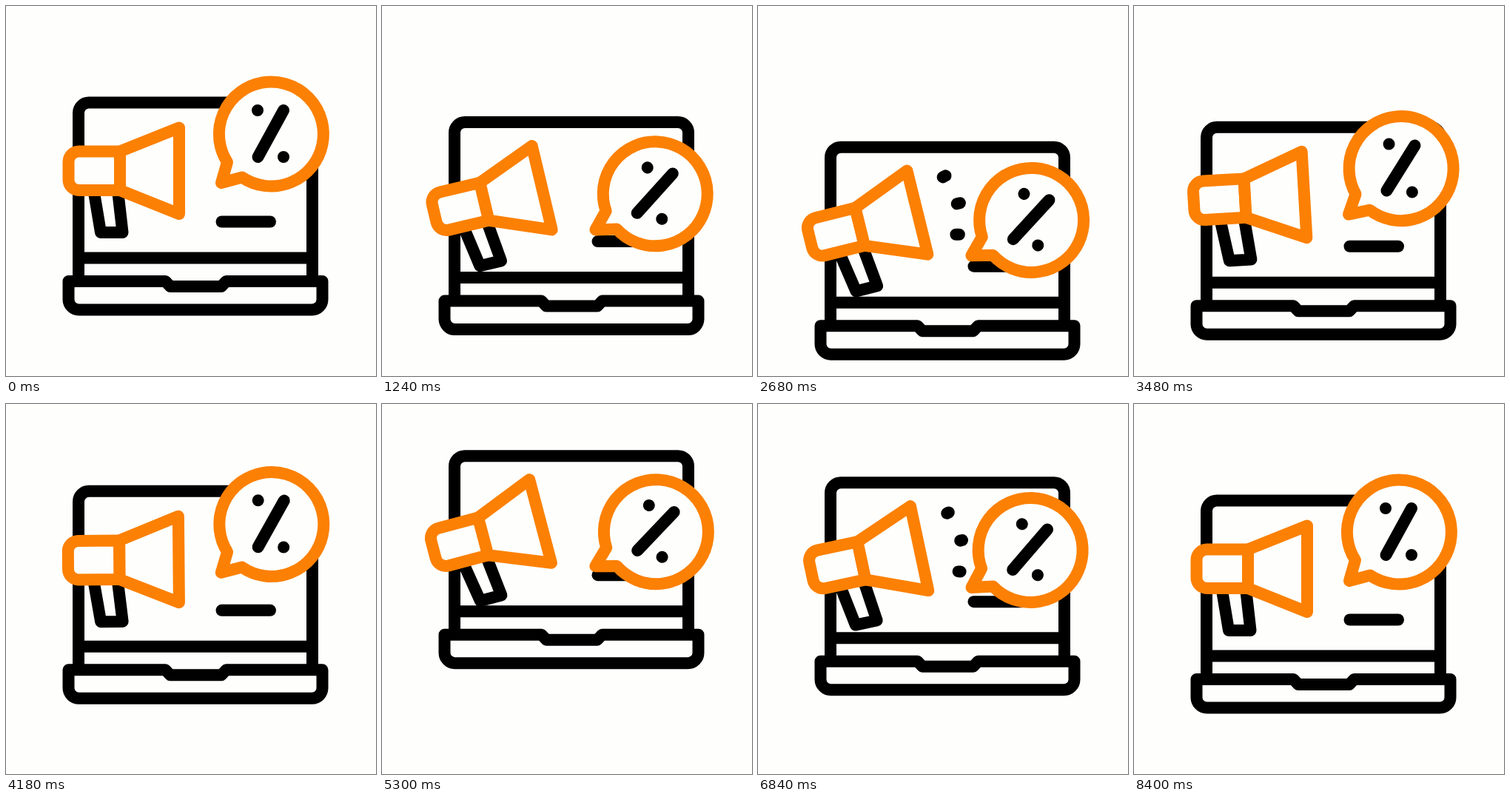
An HTML page that plays this animation: 500 px wide and 500 px high, repeating every 8420 ms.

```html
<!DOCTYPE html>
<html lang="en">
<head>
<meta charset="utf-8">
<title>Laptop promotion</title>
<style>
  html, body { margin: 0; width: 100%; height: 100%; overflow: hidden; background: #fefefc; }
  svg { display: block; width: 100%; height: 100%; }
  path { stroke: #000; stroke-width: 16; stroke-linecap: round; stroke-linejoin: round; fill: none; }
  .filled { fill: #fefefc; }
  .orange { stroke: #fc8003; }
</style>
</head>
<body>
<svg viewBox="0 0 500 500">
  <g id="scene">
    <path d="M98 372V144.500a14 14 0 0 1 14-14H400a14 14 0 0 1 14 14V372M98 340.500H414"/>
    <path class="filled" d="M84.500 372V396.500a14 14 0 0 0 14 14H413.500a14 14 0 0 0 14-14V372H297.500L291 379H222L215.500 372Z"/>
    <path d="M291.500 291.500H357"/>
    <g id="megaphone">
      <path class="filled" d="M118.500 249L128 306H157.500L151 249"/>
      <path class="filled orange" d="M154 196.500H98.500a14 14 0 0 0-14 14V235a14 14 0 0 0 14 14H154Z"/>
      <path class="filled orange" d="M154 196.500L234 164.500V281L154 249Z"/>
      <path class="ray"/>
      <path class="ray"/>
      <path class="ray"/>
    </g>
    <g id="bubble">
      <path class="filled orange" d="M319 231.500A70.500 70.500 0 1 0 299 211L291 239Z"/>
      <path d="M340.500 204L375 141M340 141h.01M375 204h.01"/>
    </g>
  </g>
</svg>
<script>
  const LOOP = 8420;
  const scene = document.getElementById('scene');
  const megaphone = document.getElementById('megaphone');
  const bubble = document.getElementById('bubble');
  const rays = [...document.querySelectorAll('.ray')];

  // Ray endpoints in megaphone space: [x1, y1, x2, y2]
  const rayLines = [
    [257.8, 189.8, 283, 183.5],
    [267, 224, 293, 224],
    [256.5, 258.8, 281.7, 265]
  ];
  // Keyframes: [step, value]
  const lift = [[0, 0], [56.5, 60.4], [113.5, -60.4], [171, 0]];
  const swing = [[0, 0], [42.3, 1], [85, 0], [127, 1], [171, 0]];

  const mix = (a, b, t) => a + (b - a) * t;

  function ease(from, to, step) {
    const t = Math.min(1, Math.max(0, (step - from) / (to - from)));
    return t * t * (3 - 2 * t);
  }

  function valueAt(keys, step) {
    const i = keys.findIndex(key => key[0] > step);
    if (i < 0) return keys[keys.length - 1][1];
    const [from, a] = keys[i - 1], [to, b] = keys[i];
    return mix(a, b, ease(from, to, step));
  }

  // Steps come in uneven triples lasting 20, 100 and 20 ms.
  function stepAt(ms) {
    const rest = ms % 140;
    return 3 * Math.floor(ms / 140) + (rest >= 120 ? 2 : rest >= 20 ? 1 : 0);
  }

  function drawRays(step) {
    const local = step < 87 ? step : step - 87;
    const head = ease(28, 44, local), tail = ease(44, 63, local);
    rays.forEach((ray, i) => {
      const [x1, y1, x2, y2] = rayLines[i];
      const point = t => `${mix(x1, x2, t)} ${mix(y1, y2, t)}`;
      ray.setAttribute('d', head > tail ? `M${point(tail)}L${point(head)}` : '');
    });
  }

  function draw() {
    const step = stepAt(performance.now() % LOOP);
    const s = valueAt(swing, step);
    scene.setAttribute('transform', `translate(0 ${valueAt(lift, step)})`);
    megaphone.setAttribute('transform', `translate(${-19.4 * s} ${20 * s}) rotate(${-20 * s} 159 235)`);
    bubble.setAttribute('transform', `translate(${16.4 * s} ${80.7 * s}) rotate(${20 * s} 357.5 172.5)`);
    drawRays(step);
    requestAnimationFrame(draw);
  }
  draw();
</script>
</body>
</html>
```
